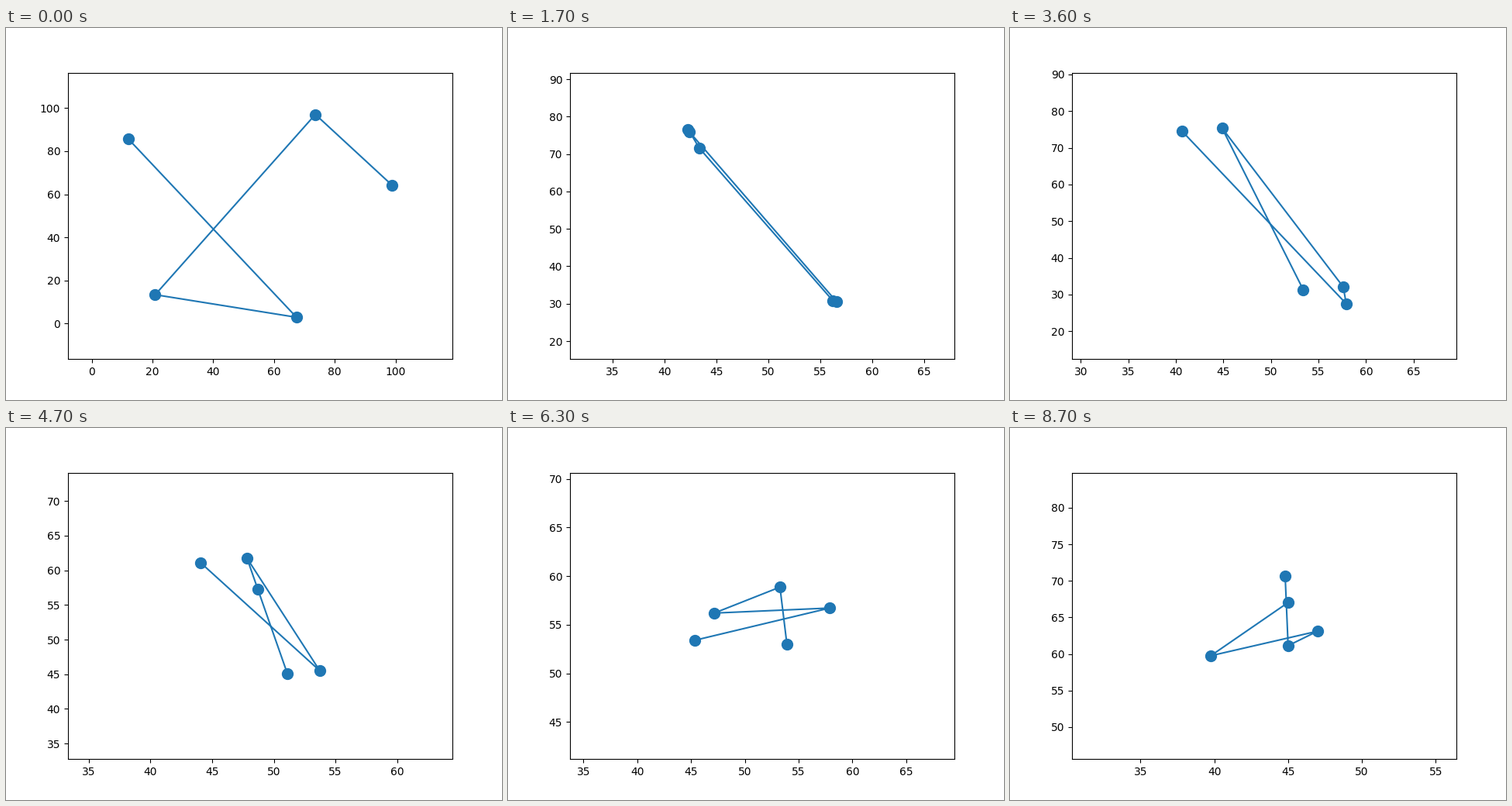
These frames come from a looping animation (640 by 480 pixels, 8800 ms). A matplotlib script:

```python
import numpy as np
import matplotlib.pyplot as plt
from matplotlib.animation import FuncAnimation

FRAMES, INTERVAL = 88, 100

# Key poses of the five linked points: frame -> x values, y values
POSES = {
    0: ([12.0, 67.4, 20.9, 73.6, 98.9], [85.8, 2.8, 13.3, 97.1, 64.1]),
    17: ([42.24, 56.57, 56.2, 43.35, 42.42], [76.45, 30.5, 30.8, 71.6, 76.0]),
    36: ([40.66, 57.92, 57.6, 44.85, 53.4], [74.5, 27.5, 32.1, 75.4, 31.3]),
    47: ([44.07, 53.73, 47.83, 48.7, 51.1], [61.1, 45.5, 61.75, 57.3, 45.1]),
    63: ([45.34, 57.9, 47.16, 53.27, 53.92], [53.4, 56.72, 56.2, 58.87, 52.96]),
    75: ([46.77, 46.54, 49.04, 42.76, 47.89], [67.03, 56.86, 58.02, 56.14, 63.46]),
    87: ([44.8, 45.0, 47.0, 39.76, 45.0], [70.67, 61.14, 63.12, 59.76, 67.04]),
}
times = np.array(list(POSES), float)
poses = np.array(list(POSES.values()))      # (pose, axis, point)


def pose_slopes():
    """Harmonic mean of neighbouring speeds, zero at turning points."""
    speed = np.diff(poses, axis=0) / np.diff(times)[:, None, None]
    a, b = speed[:-1], speed[1:]
    same = a * b > 0
    mid = np.where(same, 2 * a * b / np.where(same, a + b, 1), 0)
    return np.concatenate([speed[:1], mid, speed[-1:]])


slopes = pose_slopes()


def position(t):
    """Smooth cubic path through the poses."""
    i = min(np.searchsorted(times, t, side="right") - 1, len(times) - 2)
    h = times[i + 1] - times[i]
    s = (t - times[i]) / h
    ease = s * s * (3 - 2 * s)
    return (poses[i] + ease * (poses[i + 1] - poses[i])
            + h * s * (1 - s) * ((1 - s) * slopes[i] - s * slopes[i + 1]))


def padded(v):
    pad = 0.2 * v.max()
    return v.min() - pad, v.max() + pad


fig, ax = plt.subplots(figsize=(6.4, 4.8), dpi=100)
line, = ax.plot([], [], "o-", color="#1f77b4", markersize=10, linewidth=1.5)


def update(frame):
    x, y = position(frame)
    line.set_data(x, y)
    ax.set_xlim(*padded(x))
    ax.set_ylim(*padded(y))
    return line,


anim = FuncAnimation(fig, update, frames=FRAMES, interval=INTERVAL,
                     init_func=lambda: update(0), repeat=True, repeat_delay=0)
plt.show()
```
